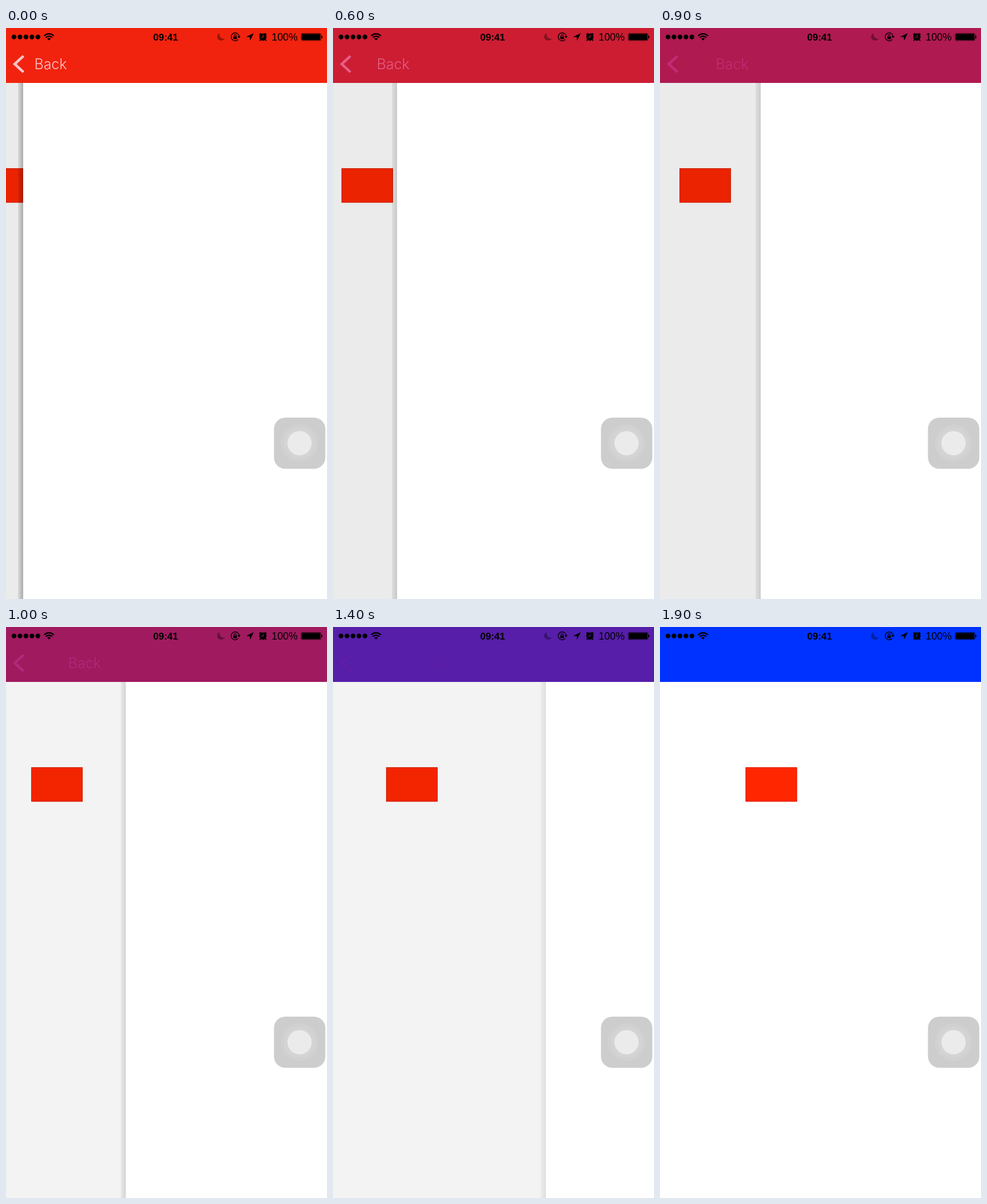
Recreate the animation shown at these times as an HTML page with a canvas. Size 561 by 998 pixels, loop 2.4 s.

```html
<!DOCTYPE html>
<html lang="en">
<head>
<meta charset="utf-8">
<title>Swipe back</title>
<style>
html, body { margin: 0; width: 100%; height: 100%; overflow: hidden; background: #fff; }
canvas { display: block; width: 561px; height: 998px; }
</style>
</head>
<body>
<canvas id="stage" width="561" height="998"></canvas>
<script>
const ctx = document.getElementById('stage').getContext('2d');
const W = 561, H = 998, BAR = 96, LOOP = 2400, STEP = 100;

// time, left edge of the sliding page
const slide = [[0, 30], [400, 43], [600, 112], [900, 176], [1200, 277], [1600, 467], [1700, W]];
// edge, then red, green, blue and alpha of the back button
const tints = [
  [30, 255, 196, 202, 1], [43, 251, 184, 192, 1], [112, 230, 92, 136, 1],
  [176, 195, 44, 116, 1], [277, 146, 32, 140, 1], [420, 100, 32, 165, 0]
];

function sample(keys, x) {
  if (x <= keys[0][0]) return keys[0].slice(1);
  for (let i = 1; i < keys.length; i++) {
    const a = keys[i - 1], b = keys[i];
    if (x <= b[0]) {
      const k = (x - a[0]) / (b[0] - a[0]);
      return a.slice(1).map((v, j) => v + (b[j + 1] - v) * k);
    }
  }
  return keys[keys.length - 1].slice(1);
}

const rgb = (r, g, b) => `rgb(${Math.round(r)},${Math.round(g)},${Math.round(b)})`;

function box(x, y, w, h, color) {
  ctx.fillStyle = color;
  ctx.fillRect(x, y, w, h);
}

function disc(x, y, r, color) {
  ctx.fillStyle = color;
  ctx.beginPath();
  ctx.arc(x, y, r, 0, Math.PI * 2);
  ctx.fill();
}

function arc(x, y, r, from, to, width) {
  ctx.lineWidth = width;
  ctx.beginPath();
  ctx.arc(x, y, r, from, to);
  ctx.stroke();
}

function path(points) {
  ctx.beginPath();
  points.forEach(([x, y]) => ctx.lineTo(x, y));
}

function line(points, width) {
  path(points);
  ctx.lineWidth = width;
  ctx.stroke();
}

function text(str, x, y, font, align = 'left') {
  ctx.font = font;
  ctx.textAlign = align;
  ctx.fillText(str, x, y);
}

function drawUnderPage(edge, p) {
  const level = 230 + 25 * p;
  const gray = p === 1 ? 255 : level < 239 ? 235 : level < 248 ? 243 : 254;
  const shade = gray / 255;
  box(0, BAR, edge, H - BAR, rgb(gray, gray, gray));

  const x = 149.6 - 0.3 * (W - edge);
  const right = Math.min(x + 89.8, edge);
  ctx.save();
  ctx.beginPath();
  ctx.rect(0, BAR, edge, H - BAR);
  ctx.clip();
  box(x, 245.3, right - x, 59.9, rgb(255 * shade, 38 * shade, 0));
  ctx.strokeStyle = rgb(205 * shade, 24 * shade, 0);
  ctx.lineWidth = 0.8;
  ctx.strokeRect(x + 0.4, 245.7, 89, 59.1);

  if (p < 1) {
    const fade = 1.2 - p;
    const shadow = ctx.createLinearGradient(edge - 9, 0, edge, 0);
    shadow.addColorStop(0, `rgba(0,0,0,${0.06 * fade})`);
    shadow.addColorStop(1, `rgba(0,0,0,${(p < 0.06 ? 0.24 : 0.15) * fade})`);
    box(edge - 9, BAR, 9, H - BAR, shadow);
  }
  ctx.restore();
}

function drawBack(edge) {
  const [r, g, b, alpha] = sample(tints, edge);
  if (alpha <= 0) return;
  ctx.globalAlpha = alpha;
  ctx.strokeStyle = ctx.fillStyle = rgb(r, g, b);
  line([[30.5, 48.8], [15.2, 63], [30.5, 77.2]], 4.5);
  text('Back', 39.5 + 0.33 * edge, 72, '300 25px Inter, "Liberation Sans", sans-serif');
  ctx.globalAlpha = 1;
}

function drawWifi() {
  const x = 75.2, y = 21.8, from = -Math.PI * 0.76, to = -Math.PI * 0.24;
  arc(x, y, 11.6, from, to, 2.3);
  arc(x, y, 7.5, from, to, 2.3);
  ctx.beginPath();
  ctx.moveTo(x, y);
  ctx.arc(x, y, 4.3, from, to);
  ctx.fill();
}

function drawMoon() {
  ctx.fillStyle = 'rgba(0,0,0,0.36)';
  ctx.beginPath();
  ctx.moveTo(373.5, 9);
  ctx.bezierCurveTo(372, 15, 377, 20, 382.8, 18.3);
  ctx.bezierCurveTo(378, 25, 369, 21.5, 369, 15.5);
  ctx.bezierCurveTo(369, 12.5, 371, 10, 373.5, 9);
  ctx.fill();
}

function drawLock() {
  arc(400.5, 15.5, 7, 0.75, Math.PI * 2 - 0.2, 1.3);
  path([[404.3, 14.2], [410, 14.2], [407.2, 17.8]]);
  ctx.fill();
  ctx.fillRect(397.3, 14.7, 6.2, 4.8);
  arc(400.4, 13.8, 1.9, Math.PI, Math.PI * 2, 1.2);
}

function drawClock(bar) {
  line([[443, 12], [446, 9.4]], 2.6);
  line([[452, 9.4], [455, 12]], 2.6);
  line([[445, 20], [443.3, 22.4]], 1.8);
  line([[453, 20], [454.7, 22.4]], 1.8);
  disc(449, 15.9, 6.3, '#000');
  ctx.strokeStyle = bar;
  line([[449.3, 11.8], [449.3, 16.2], [445.8, 16.2]], 1.1);
}

function drawStatus(bar) {
  for (let i = 0; i < 5; i++) disc(14 + 10.45 * i, 15.6, 4.2, '#000');
  ctx.strokeStyle = ctx.fillStyle = '#000';
  drawWifi();
  text('09:41', 279, 22, 'bold 17px "Liberation Sans", Arial, sans-serif', 'center');
  drawMoon();
  ctx.fillStyle = '#000';
  drawLock();
  path([[433, 9], [419.8, 15.6], [426, 16], [426.6, 22.2]]);
  ctx.fill();
  drawClock(bar);
  ctx.fillStyle = ctx.strokeStyle = '#000';
  text('100%', 464.3, 22, '17.8px "Liberation Sans", Arial, sans-serif');
  ctx.lineWidth = 0.8;
  ctx.beginPath();
  ctx.roundRect(516.2, 9.6, 34, 12.2, 1.6);
  ctx.stroke();
  ctx.fillRect(517.2, 10.5, 32, 10.4);
  ctx.fillRect(551, 13.5, 1.8, 4.4);
}

function drawTouchButton() {
  ctx.fillStyle = '#cdcdcd';
  ctx.beginPath();
  ctx.roundRect(468.3, 681, 89.8, 89.6, 20);
  ctx.fill();
  disc(513, 725.7, 32.7, '#d1d1d1');
  disc(513, 725.7, 27, '#d4d4d4');
  disc(513, 725.7, 21.2, '#ebebeb');
}

function draw(time) {
  const t = Math.floor((time % LOOP) / STEP) * STEP;
  const edge = sample(slide, t)[0];
  const p = edge / W;
  const bar = rgb(255 * (1 - p), 38 - 60 * p + 72 * p * p, 255 * p);

  box(0, 0, W, H, '#fff');
  drawUnderPage(edge, p);
  box(0, 0, W, BAR, bar);
  drawBack(edge);
  drawStatus(bar);
  drawTouchButton();
}

const start = performance.now();
function tick() {
  draw(performance.now() - start);
  requestAnimationFrame(tick);
}
tick();
</script>
</body>
</html>
```
